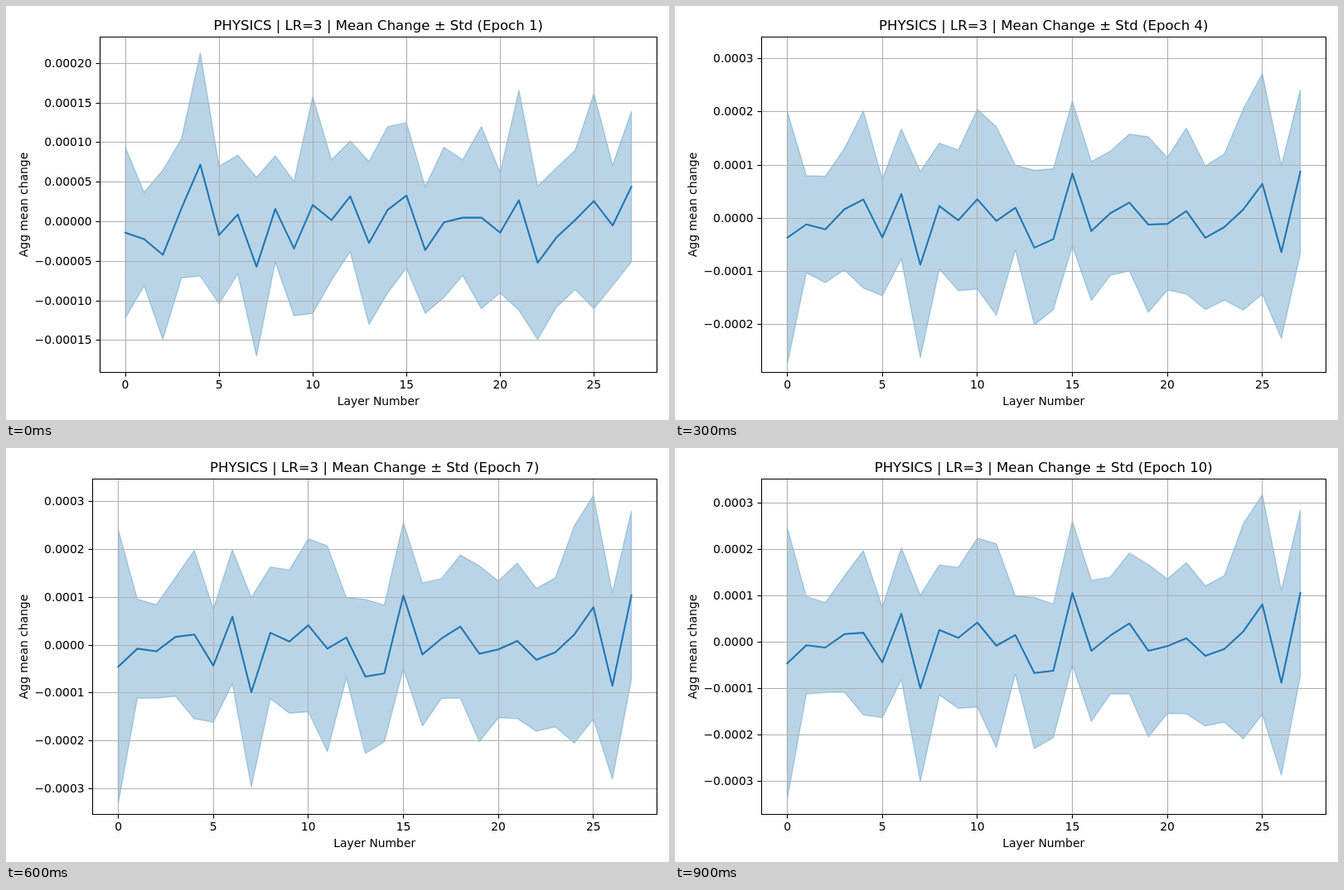
Animation of 800x500 px, one loop 1 s. Source, as an HTML page with a canvas:

```html
<!DOCTYPE html>
<html lang="en">
<head>
<meta charset="utf-8">
<title>Mean change per layer</title>
<style>
  html, body { margin: 0; width: 100%; height: 100%; overflow: hidden; background: #fefefe; }
  canvas { display: block; }
</style>
</head>
<body>
<canvas id="chart" width="800" height="500"></canvas>
<script>
const ctx = document.getElementById('chart').getContext('2d');
const TOP = 37.5, BOTTOM = 442.5, RIGHT = 785.5;
const FONT = '"DejaVu Sans", sans-serif';

// Mean and deviation per layer in millionths, before and after training
const start = {
  mean: [-14, -22, -42, 17, 72, -17, 9, -57, 16, -34, 21, 2, 32, -27,
    15, 33, -36, -1, 5, 5, -14, 27, -52, -20, 2, 26, -5, 44],
  std: [108, 59, 107, 88, 141, 87, 75, 113, 67, 85, 137, 76, 70, 103,
    105, 92, 80, 95, 73, 115, 76, 139, 97, 88, 88, 136, 76, 95]
};
const end = {
  mean: [-46, -7, -12, 17, 20, -44, 61, -100, 26, 9, 42, -8, 15, -67,
    -62, 106, -19, 14, 40, -19, -9, 8, -30, -15, 23, 81, -88, 106],
  std: [292, 105, 97, 125, 177, 119, 142, 201, 140, 152, 182, 220, 84, 163,
    144, 155, 152, 126, 152, 186, 145, 163, 151, 158, 232, 237, 199, 179]
};
const LAYERS = start.mean.length;

// Per epoch: y of value 0 and pixels per 0.0001
const zeros = [260.4, 254.3, 247.2, 256.4, 247.3, 238.3, 238, 237.75, 236, 234.3];
const units = [95.6, 80.2, 68.65, 64.25, 62, 59.7, 57.9, 56.15, 56.1, 56];

const snap = v => Math.floor(v) + 0.5;

function line(x1, y1, x2, y2, color) {
  ctx.strokeStyle = color;
  ctx.lineWidth = 1.11;
  ctx.beginPath();
  ctx.moveTo(x1, y1);
  ctx.lineTo(x2, y2);
  ctx.stroke();
}

function text(str, x, y, align = 'center', size = 13.89) {
  ctx.font = `${size}px ${FONT}`;
  ctx.textAlign = align;
  ctx.fillStyle = '#000';
  ctx.fillText(str, x, y);
}

function draw(n) {
  const zero = zeros[n - 1], unit = units[n - 1];
  const wide = n === 1;   // the first epoch has finer ticks and longer labels
  const left = wide ? 113.5 : 104.5;
  const first = wide ? 144 : 135.55;
  const step = wide ? 0.5 : 1;
  const center = (left + RIGHT) / 2 - 0.3;
  const xAt = i => first + i * (754.6 - first) / (LAYERS - 1);

  // Training converges with a cubic ease-out
  const progress = 1 - (1 - (n - 1) / 9) ** 3;
  const blend = key => start[key].map((v, i) => v + (end[key][i] - v) * progress);
  const mean = blend('mean'), std = blend('std');
  const yAt = (i, side) => zero - (mean[i] + side * std[i]) * unit / 100;

  ctx.fillStyle = '#fefefe';
  ctx.fillRect(0, 0, 800, 500);
  ctx.lineJoin = 'round';

  // Band of one standard deviation
  ctx.beginPath();
  for (let i = 0; i < LAYERS; i++) ctx.lineTo(xAt(i), yAt(i, 1));
  for (let i = LAYERS - 1; i >= 0; i--) ctx.lineTo(xAt(i), yAt(i, -1));
  ctx.closePath();
  ctx.fillStyle = '#b9d4e7';
  ctx.strokeStyle = 'rgba(31, 119, 180, 0.3)';
  ctx.lineWidth = 1.39;
  ctx.fill();
  ctx.stroke();

  // Grid, ticks and their labels
  for (let i = 0; i < LAYERS; i += 5) {
    const x = snap(xAt(i));
    line(x, TOP, x, BOTTOM, '#b0b0b0');
    line(x, BOTTOM, x, BOTTOM + 5, '#000');
    text(i, xAt(i), 462);
  }
  for (let k = -4; k <= 4; k++) {
    const y = snap(zero - k * step * unit);
    if (y < TOP || y > BOTTOM) continue;
    const label = Math.abs(k * step / 10000).toFixed(wide ? 5 : 4);
    line(left, y, RIGHT, y, '#b0b0b0');
    line(left - 5, y, left, y, '#000');
    text((k < 0 ? '\u2212' : '') + label, left - 9.9, y + 4.5, 'right');
  }

  // Mean
  ctx.beginPath();
  for (let i = 0; i < LAYERS; i++) ctx.lineTo(xAt(i), yAt(i, 0));
  ctx.strokeStyle = '#1f77b4';
  ctx.lineWidth = 2.08;
  ctx.lineCap = 'square';
  ctx.stroke();
  ctx.lineCap = 'butt';

  ctx.strokeStyle = '#000';
  ctx.lineWidth = 1.11;
  ctx.strokeRect(left, TOP, RIGHT - left, BOTTOM - TOP);

  text(`PHYSICS | LR=3 | Mean Change ± Std (Epoch ${n})`, center, 29, 'center', 16.56);
  text('Layer Number', center, 482);
  ctx.save();
  ctx.translate(26, 240);
  ctx.rotate(-Math.PI / 2);
  text('Agg mean change', 0, 0);
  ctx.restore();
}

function tick() {
  draw(Math.floor(performance.now() / 100) % 10 + 1);
  requestAnimationFrame(tick);
}
tick();
</script>
</body>
</html>
```
